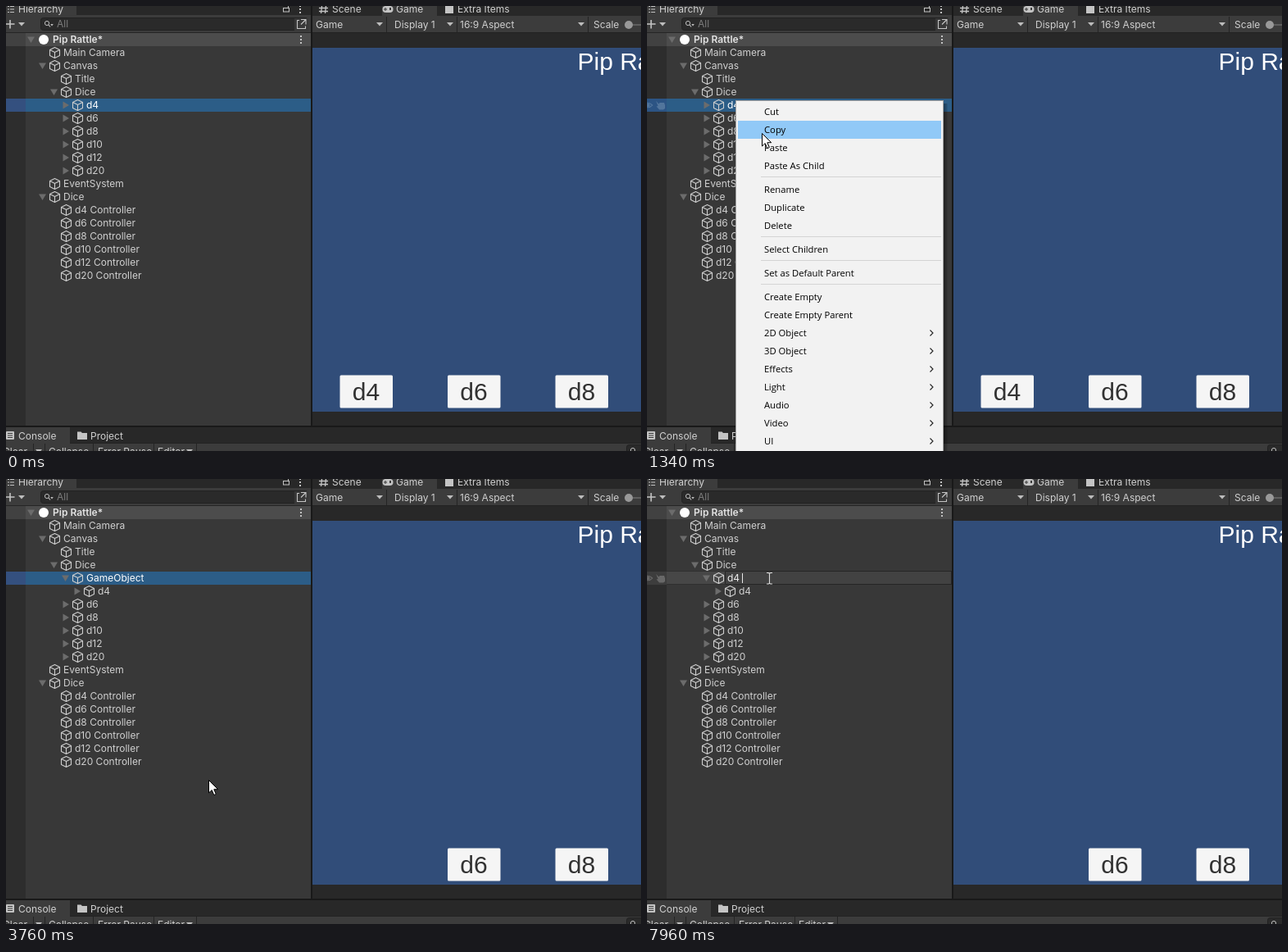
An HTML page for the animation above (8 s loop, 775x543 px).

```html
<!DOCTYPE html>
<html lang="en">
<head>
<meta charset="utf-8">
<title>Hierarchy editing</title>
<style>
  html, body { margin: 0; width: 100%; height: 100%; overflow: hidden; background: #383838; }
  svg { display: block; width: 775px; height: 543px; }
  text { font: 12px Inter, "Liberation Sans", sans-serif; fill: #d0d0d0; white-space: pre; }
  .bold { font-weight: 600; }
  .game { font: 30px "Liberation Sans", Arial, sans-serif; }
  .menu { font: 11.25px "Open Sans", "Noto Sans", sans-serif; fill: #000; }
</style>
</head>
<body>
<svg id="stage" viewBox="0 0 775 543" xmlns="http://www.w3.org/2000/svg"></svg>
<script>
const LOOP = 8000;
const MENU_OPEN = 530, MENU_CLOSE = 2560, PARENT_ADDED = 2640, RENAME = 5280;

const rect = (x, y, w, h, fill, extra = '') =>
  `<rect x="${x}" y="${y}" width="${w}" height="${h}" fill="${fill}" ${extra}/>`;
const text = (x, y, s, extra = '') => `<text x="${x}" y="${y}" ${extra}>${s}</text>`;
const path = (d, stroke, width = 1, fill = 'none', extra = '') =>
  `<path d="${d}" stroke="${stroke}" stroke-width="${width}" fill="${fill}" ${extra}/>`;
const group = (id, body, extra = '') => `<g id="${id}" ${extra}>${body}</g>`;

const downArrow = (x, y, fill = '#bdbdbd', r = 4) =>
  path(`M${x - r} ${y - r / 2}h${2 * r}l${-r} ${r + .5}z`, 'none', 0, fill);
const rightArrow = (x, y) => path(`M${x - 3.5} ${y - 4.5}v9l7.5 -4.5z`, 'none', 0, '#6c6c6c');
const openArrow = (x, y) => path(`M${x - 4.5} ${y - 3.5}h9l-4.5 7.5z`, 'none', 0, '#6c6c6c');
const cube = (x, y) => path(
  `M${x} ${y - 6.5}l6 3v7l-6 3l-6 -3v-7zM${x - 6} ${y - 3.5}l6 3l6 -3M${x} ${y - .5}v7`,
  '#cfcfcf', 1.1, 'none', 'stroke-linejoin="round"');
const dots = (x, y) => [-4, 0, 4].map(d => rect(x - 1, y + d - 1, 2, 2, '#c4c4c4')).join('');

// Each row is [depth, label, arrow]; arrow is 'v' open, '>' closed.
const dice = ['d4', 'd6', 'd8', 'd10', 'd12', 'd20'];
const listRows = withParent => [
  [0, 'Main Camera'], [0, 'Canvas', 'v'], [1, 'Title'], [1, 'Dice', 'v'],
  ...(withParent ? [[2, 'GameObject', 'v'], [3, 'd4', '>']] : [[2, 'd4', '>']]),
  ...dice.slice(1).map(d => [2, d, '>']),
  [0, 'EventSystem'], [0, 'Dice', 'v'],
  ...dice.map(d => [1, d + ' Controller'])
];
const SELECTED = 4;
const rowY = i => 57 + 16 * i;

function drawRow([depth, label, arrow], i) {
  const x = 70 + 14 * depth, y = rowY(i);
  const mark = arrow === 'v' ? openArrow(x - 25.5, y) : arrow ? rightArrow(x - 25, y) : '';
  const style = i === SELECTED ? 'class="picked" style="fill:#fff"' : '';
  return mark + cube(x - 10.5, y) + text(x, y + 4, label, style);
}

function hierarchyPanel() {
  return rect(0, 0, 373, 513, '#383838') +
    rect(0, 0, 373, 12, '#282828') + rect(0, 0, 86, 12, '#3c3c3c') +
    rect(0, 11, 373, 22, '#3c3c3c') + rect(0, 32, 373, 1, '#252525') +
    path('M2 0.5h2M5 0.5h5M2 4h2M5 4h5M2 7.5h2M5 7.5h5', '#c4c4c4', 1.2) +
    text(15, 8, 'Hierarchy') +
    rect(338.5, 2.5, 7, 4.5, 'none', 'stroke="#c4c4c4"') + path('M344.5 2V0', '#c4c4c4') + dots(359, 4) +
    path('M0 22h10.500M5 17v10.500', '#c4c4c4', 1.6) + downArrow(19, 22) +
    rect(42.5, 14.5, 326, 15, '#2a2a2a', 'rx="3" stroke="#212121"') +
    '<circle cx="50" cy="21" r="2.6" fill="none" stroke="#bdbdbd"/>' +
    path('M52 23l2 2.500', '#bdbdbd', 1.2) + downArrow(56, 23, '#bdbdbd', 1.8) +
    text(62, 26, 'All', 'style="fill:#7d7d7d"') +
    rect(352, 15, 17, 15, '#383838') +
    path('M358 17.500h-2.500v10h10v-3M360 16.500h6v6M366 16.500l-6 6', '#c4c4c4', 1.1) +
    rect(0, 33, 24, 480, '#2d2d2d') +
    rect(0, 33, 24, 16, '#414141') + rect(24, 33, 348, 16, '#4c4c4c') +
    openArrow(30.5, 41) + '<circle cx="46" cy="41" r="6" fill="#fff"/>' +
    text(57, 45, 'Pip Rattle*', 'class="bold" style="fill:#e4e4e4"') + dots(360, 41);
}

function gamePanel() {
  const button = (id, x, label) => group(id,
    rect(x, 450.5, 64.5, 40, '#f5f5f5', 'rx="1.500"') +
    text(x + 32, 481, label, 'class="game" text-anchor="middle" style="fill:#323232"'));
  const line = x => rect(x, 13, 1, 19, '#242424');
  return rect(372, 0, 403, 513, '#282828') +
    rect(459, 0, 67, 13, '#3c3c3c') + rect(374, 12, 401, 21, '#3c3c3c') +
    rect(374, 32, 401, 1, '#222') + rect(372, 0, 2, 513, '#191919') +
    path('M385.500 0l-1 9M390.500 0l-1 9M382 2.500h11M382 6.500h11', '#c4c4c4', 1.3) +
    text(398, 8, 'Scene') +
    rect(459.5, 0, 13, 8, '#c4c4c4', 'rx="4"') + path('M461 4h4M463 2v4', '#3c3c3c') +
    rect(468, 2, 2, 3, '#3c3c3c') + text(476, 8, 'Game') +
    rect(536, 0, 10, 9, '#c4c4c4') + text(551, 8, 'Extra Items') +
    text(378, 27, 'Game') + downArrow(456, 22) + line(464) +
    text(474, 27, 'Display 1') + downArrow(542, 22) + line(550) +
    text(554, 27, '16:9 Aspect') + downArrow(702, 22) + line(710) +
    text(717, 27, 'Scale') + rect(760, 22, 15, 2, '#5e5e5e') +
    '<circle cx="760" cy="23" r="5" fill="#999"/>' +
    rect(374, 51, 401, 444, '#314d79') +
    text(697.5, 78, 'Pip Rattle', 'class="game" style="fill:#fff"') +
    button('firstButton', 407.5, 'd4') + button('b2', 539, 'd6') + button('b3', 670.5, 'd8');
}

function consolePanel() {
  const line = x => rect(x, 534, 1, 9, '#242424');
  return rect(0, 512, 775, 31, '#282828') + rect(0, 512, 775, 2, '#191919') +
    rect(0, 514, 78, 20, '#3c3c3c') + rect(0, 533, 775, 10, '#3c3c3c') +
    rect(78, 533, 697, 1, '#232323') +
    rect(0, 519, 10, 10, '#c4c4c4', 'rx="1"') + path('M2 521.500h6M2 524h6M2 526.500h6', '#3c3c3c') +
    text(15, 529, 'Console') +
    path('M87 519.500h4.500l1.500 1.500h6v8h-12z', 'none', 0, '#c4c4c4') + text(103, 529, 'Project') +
    text(-4, 548, 'Clear') + downArrow(40, 543) + text(52, 548, 'Collapse') +
    text(112, 548, 'Error Pause') + text(185, 548, 'Editor') + downArrow(224, 543) +
    [33, 47, 106, 180, 232].map(line).join('') +
    rect(757.5, 535.5, 30, 15, '#2a2a2a', 'rx="3" stroke="#212121"') +
    '<circle cx="765" cy="542" r="2.6" fill="none" stroke="#bdbdbd"/>';
}

// Blank entries are separators; a trailing ">" marks a submenu.
const menuItems = ('Cut|Copy|Paste|Paste As Child||Rename|Duplicate|Delete||Select Children||' +
  'Set as Default Parent||Create Empty|Create Empty Parent|2D Object>|3D Object>|Effects>|' +
  'Light>|Audio>|Video>|UI>').split('|');
const itemTops = [];

function contextMenu() {
  let y = 118, body = '';
  for (const item of menuItems) {
    if (!item) {
      body += rect(139, y + 2, 220, 1, '#d4d4d4');
      y += 7;
      continue;
    }
    itemTops.push(y);
    body += text(143, y + 15, item.replace('>', ''), 'class="menu"');
    if (item.endsWith('>')) body += path(`M345.500 ${y + 7.5}l3.500 3.500l-3.500 3.500`, '#222', 1.1);
    y += 22;
  }
  const shadow = [5, 4, 3, 2].map(d => rect(112, 119, 250 + d, 430, '#000', 'opacity=".09"')).join('');
  return shadow + rect(108.5, 115.5, 253, 440, '#f2f2f2', 'stroke="#a3a3a3"') +
    rect(111, 0, 248, 22, '#91c9f7', 'id="highlight"') + body;
}

const eyeAndHand =
  path('M-4 0q5 -5.500 10.500 0q-5.500 5.500 -10.500 0z', 'currentColor', 1.2) +
  '<circle cx="1.5" cy="0" r="2" fill="currentColor"/>' +
  path('M11 -5l3.500 3.500l1 -1.500h5.500l1 3v4l-2 1.500h-5l-3.500 -4l2 -.500z', 'none', 0, 'currentColor');

const renameRow =
  rect(24, 113, 348, 16, '#474747') +
  rect(95.5, 112.5, 276, 16, '#424242', 'stroke="#252525"') +
  path('M24 112.500h72M24 128.500h72', '#303030') +
  openArrow(72.5, 121) + cube(87.5, 121) +
  rect(97.5, 113.5, 71.5, 14.5, '#3d6eb4', 'id="marked"') +
  text(98, 125, '', 'id="typed" style="fill:#eee"') +
  rect(116, 115, 1, 12, '#e8e8e8', 'id="caret"');

const arrowCursor = path('M.5 .5v15.500l3.700 -3.400l2.600 6l2.500 -1.100l-2.500 -5.800h4.900z', '#000', 1, '#fff');
const beamCursor = path('M146 114.500h2.500l1 1l1 -1h2.500M149.500 115v12M146 128h2.500l1 -1l1 1h2.500', '#dcdcdc', 1.1);

const stage = document.getElementById('stage');
stage.innerHTML = hierarchyPanel() +
  rect(24, 113, 348, 16, '#2c5d87', 'id="selection"') +
  rect(0, 113, 24, 16, '#34507f', 'id="gutter"') +
  group('listBefore', listRows(false).map(drawRow).join('')) +
  group('listAfter', listRows(true).map(drawRow).join('')) +
  group('rename', renameRow) +
  group('hover', rect(-4, -8, 28, 16, '#3d3d3d', 'id="hoverBack"') + eyeAndHand) +
  gamePanel() + consolePanel() +
  group('menu', contextMenu()) +
  '<circle id="click" cx="246" cy="374" r="15" fill="#ffee38"/>' +
  group('arrow', arrowCursor) + group('beam', beamCursor);

const ui = {};
stage.querySelectorAll('[id]').forEach(node => ui[node.id] = node);
const show = (node, on) => node.style.display = on ? '' : 'none';
const clamp = v => Math.max(0, Math.min(1, v));

// Pointer waypoints: time, x, y.
const route = [
  [30, -14, 140], [200, 30, 106], [420, 100, 112], [520, 108, 115], [1220, 108, 115],
  [1340, 140, 155], [1500, 181, 232], [1650, 213, 302], [1800, 235, 348], [1980, 246, 371],
  [2129, 246, 371], [2130, 246, 373], [3759, 246, 373], [3760, 247, 367], [3850, 205, 96],
  [4050, 205, 96], [4200, 339, -22], [4460, 339, -22], [4580, 160, 132], [4670, 148, 120]
];

function pointerAt(t) {
  const next = route.findIndex(p => p[0] > t);
  if (next === 0) return route[0].slice(1);
  if (next < 0) return route[route.length - 1].slice(1);
  const [t0, x0, y0] = route[next - 1], [t1, x1, y1] = route[next];
  const k = (t - t0) / (t1 - t0);
  return [x0 + (x1 - x0) * k, y0 + (y1 - y0) * k];
}

// Typed states: start, content, caret position.
const typing = [[RENAME, 'GameObject', 0], [7490, 'd', 106], [7790, 'd4', 113], [7960, 'd4 ', 116]];

function render(t) {
  const [x, y] = pointerAt(t);
  const renaming = t >= RENAME, added = t >= PARENT_ADDED;
  const menuOpen = t >= MENU_OPEN && t < MENU_CLOSE;

  show(ui.listBefore, !added);
  show(ui.listAfter, added);
  show(ui.firstButton, !added);
  ui.listAfter.querySelector('.picked').style.display = renaming ? 'none' : '';

  show(ui.menu, menuOpen);
  ui.menu.setAttribute('opacity', clamp((t - MENU_OPEN) / 150));
  const item = itemTops.findIndex(top => y >= top && y < top + 22);
  show(ui.highlight, item >= 0 && t > 1220 && t < 2470);
  if (item >= 0) ui.highlight.setAttribute('y', itemTops[item]);

  const count = added ? 18 : 17;
  const row = menuOpen ? SELECTED : Math.floor((y - 49) / 16);
  const hovering = x >= 0 && row >= 0 && row < count;
  const onSelected = row === SELECTED && !renaming;
  show(ui.hover, hovering);
  ui.hover.setAttribute('transform', `translate(0 ${rowY(row)})`);
  ui.hover.style.color = onSelected ? '#52759c' : '#686868';
  ui.hoverBack.setAttribute('fill', onSelected ? '#2c5484' : '#3d3d3d');

  show(ui.selection, !renaming);
  show(ui.gutter, !renaming);
  show(ui.rename, renaming);
  if (renaming) {
    const [, content, caretX] = typing.filter(s => s[0] <= t).pop();
    ui.typed.textContent = content;
    show(ui.marked, !caretX);
    show(ui.caret, caretX > 0);
    ui.caret.setAttribute('x', caretX);
  }

  show(ui.click, t >= 2430 && t < 2760);
  ui.click.setAttribute('opacity', .78 * clamp((2760 - t) / 140));
  show(ui.arrow, !renaming);
  ui.arrow.setAttribute('transform', `translate(${Math.round(x)} ${Math.round(y)})`);
  show(ui.beam, renaming);
}

let start;
function frame(now) {
  start ??= now;
  render((now - start) % LOOP);
  requestAnimationFrame(frame);
}
render(0);
requestAnimationFrame(frame);
</script>
</body>
</html>
```
